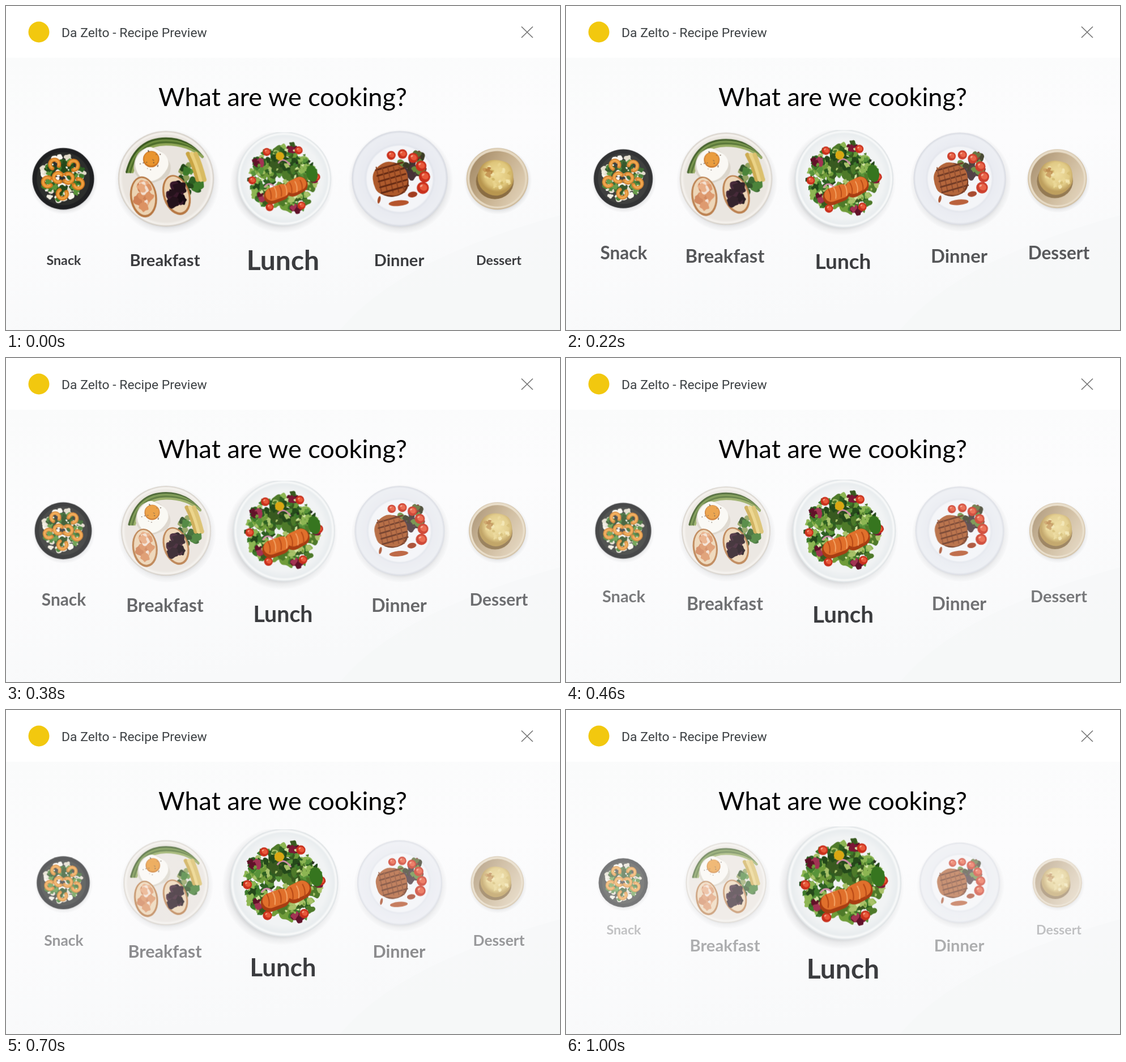
Animation, 978 px wide and 573 px high, one loop 1020 ms. Source, as an HTML page:

```html
<!DOCTYPE html>
<html lang="en">
<head>
<meta charset="utf-8">
<title>Recipe Preview</title>
<style>
  html, body { margin: 0; width: 100%; height: 100%; overflow: hidden; background: #fff; }
  svg { display: block; width: 100vw; height: 100vh; }
  .head { font: 400 22.9px Roboto, sans-serif; fill: #3c4043; }
  .ask { font: 400 45.1px Lato, sans-serif; }
  .label { font-family: Lato, sans-serif; font-weight: 700; fill: #3b3c3f; }
  .ask, .label { text-anchor: middle; }
  .plate { animation: plate 1020ms steps(50) infinite; }
  .label { animation: lift 1020ms steps(50) infinite, size 1020ms infinite; }
  @keyframes plate {
    from { scale: var(--from); opacity: 1; }
    98.039%, to { scale: var(--to); opacity: var(--fade); }
  }
  @keyframes lift {
    from { translate: 0 0; opacity: 1; }
    98.039%, to { translate: 0 var(--rise); opacity: var(--fade); }
  }
  /* the type jumps to its start size after one tick */
  @keyframes size {
    from, 1.959% { scale: 1; }
    1.96% { scale: var(--from); animation-timing-function: steps(49); }
    98.039%, to { scale: 1; }
  }
</style>
</head>
<body>
<svg viewBox="0 0 978 573" preserveAspectRatio="none">
  <defs>
    <linearGradient id="page" x2=".3" y2="1">
      <stop offset="0" stop-color="#fafbfb"/><stop offset=".5" stop-color="#fcfcfd"/><stop offset="1" stop-color="#f8f9fa"/>
    </linearGradient>
    <radialGradient id="shade">
      <stop offset=".8" stop-color="#3a3d42" stop-opacity=".26"/><stop offset=".9" stop-color="#3a3d42" stop-opacity=".08"/><stop offset="1" stop-color="#3a3d42" stop-opacity="0"/>
    </radialGradient>
    <radialGradient id="china">
      <stop offset=".8" stop-color="#f1f3f4"/><stop offset=".92" stop-color="#e9edef"/><stop offset=".96" stop-color="#fafbfb"/><stop offset="1" stop-color="#d9dee1"/>
    </radialGradient>
    <radialGradient id="cream">
      <stop offset=".9" stop-color="#e9e4de"/><stop offset=".96" stop-color="#f6f3ef"/><stop offset="1" stop-color="#c9c2b8"/>
    </radialGradient>
    <radialGradient id="blue">
      <stop offset=".68" stop-color="#f4f5f8"/><stop offset=".71" stop-color="#e2e5ec"/><stop offset=".75" stop-color="#e9ebf1"/><stop offset=".95" stop-color="#eceef3"/><stop offset="1" stop-color="#d3d6de"/>
    </radialGradient>
    <linearGradient id="clay" x2="1" y2=".6">
      <stop offset="0" stop-color="#9d8360"/><stop offset=".5" stop-color="#c2ab88"/><stop offset="1" stop-color="#ddccb1"/>
    </linearGradient>
    <radialGradient id="scoop" cx=".55" cy=".4">
      <stop offset="0" stop-color="#efdc98"/><stop offset=".7" stop-color="#dfc67b"/><stop offset="1" stop-color="#b8964f"/>
    </radialGradient>
    <clipPath id="crop"><rect x="-130" y="-98.5" width="240" height="230"/></clipPath>
  </defs>
  <rect y="91.5" width="978" height="482" fill="url(#page)"/>
  <path d="M590 573Q690 450 978 370V573Z" fill="#f3f5f6" opacity=".4"/>
  <circle cx="58" cy="46" r="18.5" fill="#f2c80f"/>
  <text class="head" x="98" y="54.5">Da Zelto - Recipe Preview</text>
  <path d="M910 36.5l20 19.5m0-19.5l-20 19.5" stroke="#757575" stroke-width="1.7"/>
  <text class="ask" x="488.5" y="177">What are we cooking?</text>
  <g id="menu"></g>
</svg>
<script>
const NS = 'http://www.w3.org/2000/svg';
let seed = 7;
const rnd = () => {
  seed = (seed + 0x6D2B79F5) | 0;
  let t = Math.imul(seed ^ seed >>> 15, 1 | seed);
  t = t + Math.imul(t ^ t >>> 7, 61 | t) ^ t;
  return ((t ^ t >>> 14) >>> 0) / 4294967296;
};
const span = (a, b) => a + (b - a) * rnd();
const pick = list => list[Math.floor(rnd() * list.length)];

function add(parent, tag, attrs) {
  const el = document.createElementNS(NS, tag);
  for (const key in attrs) el.setAttribute(key, attrs[key]);
  return parent.appendChild(el);
}
const oval = (g, cx, cy, rx, ry, fill, turn = 0) =>
  add(g, 'ellipse', { cx, cy, rx, ry, fill, transform: `rotate(${turn} ${cx} ${cy})` });
const disc = (g, x, y, r, fill) => oval(g, x, y, r, r, fill);
const line = (g, d, stroke, width) =>
  add(g, 'path', { d, stroke, 'stroke-width': width, fill: 'none', 'stroke-linecap': 'round' });

// Calls put(x, y, angle) at even steps along a circle, angles in degrees
function around(count, r, start, put, sweep = 360) {
  for (let i = 0; i < count; i++) {
    const deg = start + sweep * i / count, a = deg * Math.PI / 180;
    put(r * Math.cos(a), r * Math.sin(a), deg);
  }
}
// Closed smooth outline with a ragged radius
function blob(g, x, y, r, fill, rough = .4, n = 11) {
  const pts = [];
  around(n, 1, 0, (u, v) => {
    const d = r * (1 + rough * span(-1, 1));
    pts.push([x + d * u, y + d * v]);
  });
  const mid = i => pts[i % n].map((c, k) => (c + pts[(i + 1) % n][k]) / 2);
  const d = pts.map((p, i) => `Q${p} ${mid(i)}`).join('');
  add(g, 'path', { d: `M${mid(n - 1)}${d}Z`, fill });
}
function scatter(g, count, x, y, rx, ry, size, colors, rough) {
  for (let i = 0; i < count; i++) {
    const a = span(0, 2 * Math.PI), d = Math.sqrt(rnd());
    blob(g, x + rx * d * Math.cos(a), y + ry * d * Math.sin(a), size * span(.7, 1.3), pick(colors), rough);
  }
}
function tomato(g, x, y, r) {
  disc(g, x, y, r, '#c9301c');
  oval(g, x + r * .1, y - r * .1, r * .65, r * .55, '#e8583a', 30);
  oval(g, x - r * .25, y - r * .35, r * .25, r * .15, '#f5a58c', -30);
}
const kale = ['#2d5f22', '#3d7a2b', '#24481a', '#58933a'];
const lettuce = ['#4e7a2a', '#6f9c3a', '#8db653', '#a9c26a', '#385a20'];
const beet = ['#7c1836', '#a23353', '#611229'];
const rice = ['#f1ece0', '#e3dccb', '#fbf8f0'];
const jam = ['#24121b', '#38192a', '#180b12'];

function shrimp(g, x, y, turn) {
  const s = add(g, 'g', { transform: `translate(${x} ${y}) rotate(${turn})` });
  line(s, 'M-12 7A15 15 0 1 1 10 12', '#d37a20', 13);
  line(s, 'M-12 4A14 14 0 1 1 11 9', '#f0a03e', 7);
}
function snack(g) {
  disc(g, 0, 0, 100, '#1f2022');
  disc(g, 0, 0, 86, '#2c2e2c');
  scatter(g, 60, 0, 0, 74, 74, 9, rice, .3);
  around(6, 46, 40, (x, y) => scatter(g, 9, x, y, 22, 20, 10, kale, .45));
  scatter(g, 22, 0, 0, 70, 70, 4, rice, .4);
  const put = (x, y, a) => shrimp(g, x, y - 3, a + 90);
  around(5, 52, -52, put);
  around(2, 16, 0, put);
}
function toast(g, x, y, turn, spread) {
  oval(g, x, y, 28, 43, '#b77843', turn);
  oval(g, x, y - 1, 24, 39, '#ecd3b2', turn);
  scatter(g, 24, x, y - 4, 15, 27, 9, spread, .35);
}
function breakfast(g) {
  disc(g, 0, 0, 100, 'url(#cream)');
  // stalks share one arc and step inwards
  ['#39571f', '#6f8f40', '#4d6d2a', '#8fa657'].forEach((c, i) =>
    line(g, `M${i * 4 - 82} -14Q${i * 3 - 64} ${i * 4 - 84} 0 ${i * 4 - 84}Q46 ${i * 4 - 84} 76 -46`, c, 5));
  blob(g, -29, -27, 38, '#d9d3c8', .12);
  blob(g, -31, -30, 37, '#faf8f3', .14);
  disc(g, -31, -41, 17, '#c9701d');
  disc(g, -31, -42, 15, '#e9952f');
  scatter(g, 14, -31, -34, 26, 26, 1, ['#5b4a3a'], .2);
  scatter(g, 24, 52, 2, 26, 34, 9, [...kale, '#8a9c55'], .4);
  ['#c9a443', '#ead07d', '#d8bb62'].forEach((c, i) =>
    line(g, `M${46 + i * 8} -52Q${58 + i * 7} -30 ${66 + i * 7} 2`, c, 9));
  toast(g, -47, 38, -8, ['#dc9263', '#e7a87d', '#cf8054', '#f3dfd0']);
  toast(g, 22, 34, -18, jam);
}
function lunch(g) {
  disc(g, 0, 0, 100, 'url(#china)');
  scatter(g, 44, -2, 0, 62, 66, 13, [...kale, ...lettuce], .55);
  scatter(g, 110, -2, 0, 72, 74, 6, [...lettuce, ...kale], .6);
  around(5, 66, -3, (x, y) => scatter(g, 4, x, y, 8, 8, 7, beet, .45));
  scatter(g, 40, -3, -5, 66, 66, 3, [...lettuce, '#d4e5a4', '#24301c'], .6);
  around(3, 34, 150, (x, y) => line(g, `M${x - 12} ${y}q10 -14 24 4`, '#d390ae', 3));
  around(6, 68, -63, (x, y) => tomato(g, x, y, 8.5));
  disc(g, -9, -48, 9, '#d9a713');
  oval(g, 59, -11, 12, 18, '#36751f', -12);
  // two pieces of fish
  line(g, 'M-26 37L-6 29M18 21L33 13', '#a83d12', 34);
  line(g, 'M-26 33L-4 25M18 17L33 10', '#e0702c', 28);
  for (let i = 0; i < 7; i++)
    line(g, `M${i * 11 - 32} ${21 - i * 3}q6 10 4 22`, i % 2 ? '#f3a263' : '#b94a17', 2.2);
}
function dinner(g) {
  disc(g, 0, 0, 100, 'url(#blue)');
  scatter(g, 22, 24, -30, 32, 24, 8, ['#3a3a24', '#5c6b33', '#463238', '#7d2b25', '#678a3c'], .4);
  around(6, 52, -110, (x, y, a) => tomato(g, x, y, 12 + a / 40), 158);
  blob(g, -18, 5, 38, '#6b2e14', .1);
  blob(g, -20, 1, 37, '#ae5a2c', .1);
  for (let i = -2; i < 3; i++) {
    line(g, `M${i * 3 - 44} ${i * 12 + 6}l56 -16`, '#642a13', 3.5);
    line(g, `M${i * 12 - 25} -24l11 52`, '#8a4120', 2.5);
  }
  oval(g, -2, 51, 21, 6, '#b5542c', -5);
  oval(g, 27, 33, 10, 6, '#a23d20', -10);
  oval(g, -43, 44, 3, 8, '#a64b27', 12);
}
function dessert(g) {
  disc(g, 0, 0, 100, '#cdb999');
  disc(g, 0, -1, 97, '#e5d8c1');
  disc(g, 0, 0, 90, 'url(#clay)');
  oval(g, -8, 8, 61, 58, '#8a6d43');
  blob(g, -5, -6, 59, 'url(#scoop)', .06, 16);
  scatter(g, 22, 0, -6, 44, 42, 6, ['#e9d48d', '#d3b868', '#f1e2a8'], .5);
  scatter(g, 8, -35, -22, 14, 16, 8, ['#b98443', '#c79a57', '#a8733a'], .4);
}

// Radii and fades run from start to end; the row mirrors around the hero
const hero = { from: 83, to: 101, fade: 1, type: 48, rise: 7.5, dim: 1 };
const side = { from: 84.5, to: 71, fade: .65, type: 29.1, rise: -33.5, dim: .4 };
const edge = { from: 54.5, to: 43.5, fade: .6, type: 23.2, rise: -61, dim: .3 };
const dishes = [
  { name: 'Snack', draw: snack, tier: edge, x: 101, labelX: 102 },
  { name: 'Breakfast', draw: breakfast, tier: side, x: 282.5, labelX: 280.5 },
  { name: 'Lunch', draw: lunch, tier: hero, x: 491, labelX: 489 },
  { name: 'Dinner', draw: dinner, tier: side, x: 695, labelX: 694 },
  { name: 'Dessert', draw: dessert, tier: edge, x: 867.3, labelX: 870 }
];
const PLATE_Y = 305.5, LABEL_Y = 450, START_TYPE = 33.9;
const menu = document.getElementById('menu');
const at = (x, y) => add(menu, 'g', { transform: `translate(${x} ${y})` });
const setVars = (el, vars) => { for (const k in vars) el.style.setProperty('--' + k, vars[k]); };

for (const { name, draw, tier, x, labelX } of dishes) {
  const plate = add(at(x, PLATE_Y), 'g', { class: 'plate' });
  setVars(plate, { from: tier.from / 100, to: tier.to / 100, fade: tier.fade });
  const art = add(plate, 'g', tier === hero ? { 'clip-path': 'url(#crop)' } : {});
  disc(art, tier === hero ? -5 : 2, 6, 110, 'url(#shade)');
  draw(art);

  const label = add(at(labelX, LABEL_Y), 'text', { class: 'label', y: '.36em', 'font-size': tier.type });
  label.textContent = name;
  const start = START_TYPE / tier.type;
  setVars(label, { rise: tier.rise + 'px', from: start + .02 * (1 - start), fade: tier.dim });
}
</script>
</body>
</html>
```
